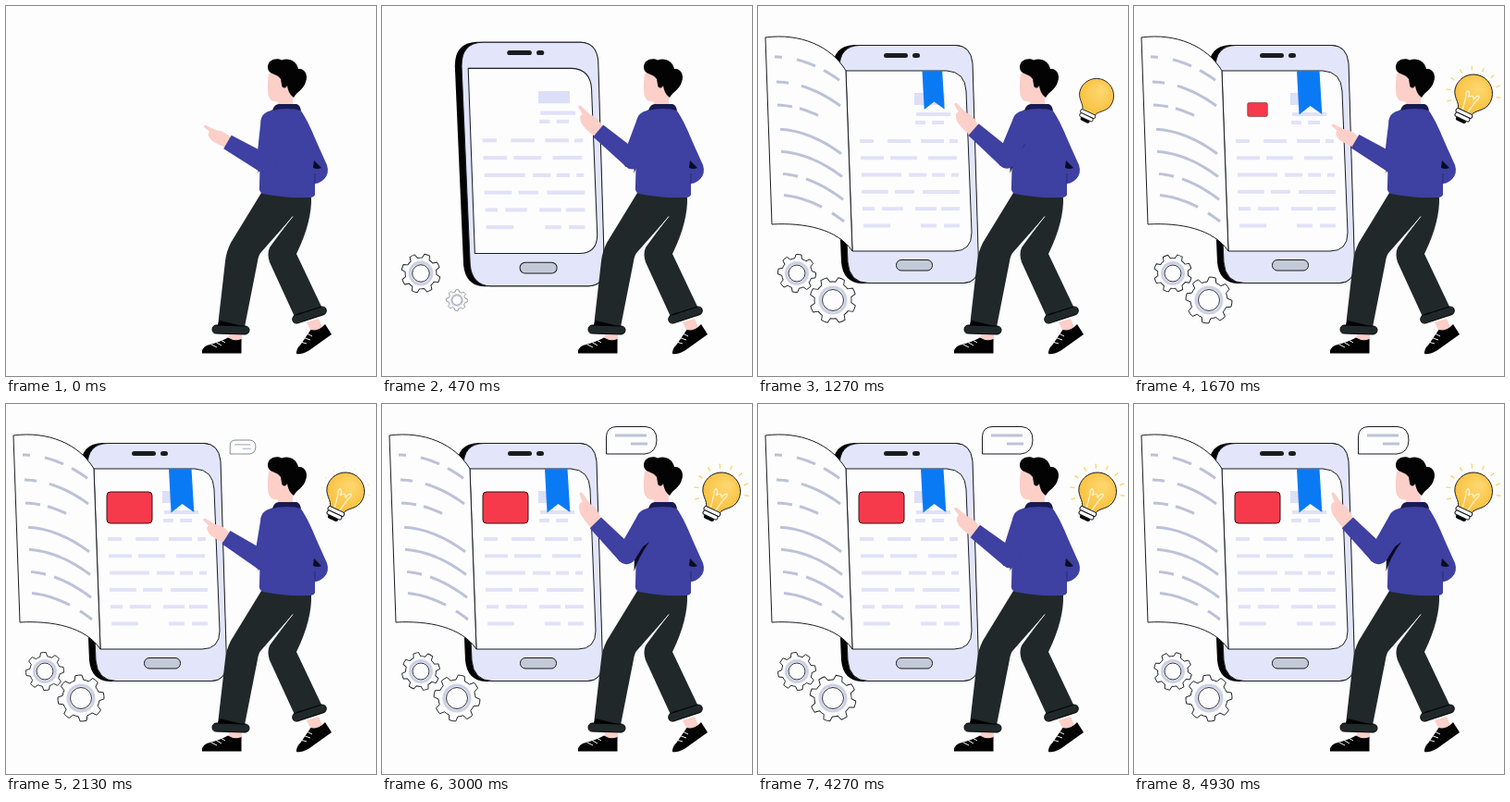
An HTML page with a canvas for the animation above (4.99 s loop, 400x400 px).

```html
<!DOCTYPE html>
<html lang="en">
<head>
<meta charset="utf-8">
<title>Reading on a phone</title>
<style>
html, body { margin: 0; width: 100%; height: 100%; overflow: hidden; background: #fdfdfd; }
canvas { display: block; width: 100vw; height: 100vh; }
</style>
</head>
<body>
<canvas id="stage"></canvas>
<script>
const LOOP = 4990, STEP = LOOP / 75, TAU = Math.PI * 2;
const PAPER = '#fdfdfd', INK = '#1a1c22', GREY = '#bcc2d8', SKIN = '#fccfc8';
const SHIRT = '#3e40a2', SHADE = '#0a0c1e', TROUSERS = '#20282a', BLACK = '#030304';

const canvas = document.getElementById('stage');
const ctx = canvas.getContext('2d');
const ratio = window.devicePixelRatio || 1;
canvas.width = canvas.height = 400 * ratio;

const mix = (a, b, u) => a + (b - a) * u;
const clamp = x => Math.min(1, Math.max(0, x));
const smooth = x => { x = clamp(x); return x * x * (3 - 2 * x); };

// Grow past full size, then settle.
function pop(t, start, peak = 1.2) {
  const d = t - start;
  return d < 300 ? peak * smooth(d / 300) : mix(peak, 1, smooth((d - 300) / 220));
}

function shape(d, fill, stroke, width = 1) {
  const p = new Path2D(d);
  if (fill) { ctx.fillStyle = fill; ctx.fill(p); }
  if (stroke) { ctx.strokeStyle = stroke; ctx.lineWidth = width; ctx.stroke(p); }
}

function bar(x, y, w, h, r, fill, stroke) {
  ctx.beginPath();
  ctx.roundRect(x, y, w, h, r);
  ctx.fillStyle = fill;
  ctx.fill();
  if (stroke) { ctx.strokeStyle = stroke; ctx.lineWidth = 1; ctx.stroke(); }
}

function circle(x, y, r, fill, stroke, width = 1) {
  ctx.beginPath();
  ctx.arc(x, y, r, 0, TAU);
  if (fill) { ctx.fillStyle = fill; ctx.fill(); }
  if (stroke) { ctx.strokeStyle = stroke; ctx.lineWidth = width; ctx.stroke(); }
}

function scaled(x, y, s, draw) {
  if (s <= 0.001) return;
  ctx.save();
  ctx.translate(x, y);
  ctx.scale(s, s);
  ctx.translate(-x, -y);
  draw();
  ctx.restore();
}

function turned(x, y, angle, draw) {
  ctx.save();
  ctx.translate(x, y);
  ctx.rotate(angle);
  draw();
  ctx.restore();
}

const TEXT_ROWS = [
  [110, 125, 140, 165, 176, 201, 207, 216],
  [111, 136, 143, 172, 184, 215],
  [112, 155, 163, 182, 188, 202, 209, 217],
  [112, 141, 148, 169, 178, 218],
  [113, 126, 134, 157, 170, 193, 198, 218],
  [114, 143, 176, 193, 201, 218]
];

function phone() {
  shape('M104 42H214Q230 43 232 62L238.500 280Q238.500 299 222 300H112Q92 299 90 277L81 68Q80.500 43 104 42Z', BLACK);
  shape('M110 42.5H214Q230 43 232 62L238.500 280Q238.500 299 222 299.5H119Q99 299 97 277L88 68Q87.500 43 110 42.5Z', '#e3e6fa', INK);
  shape('M95 70H204Q224 71 225 92L231 245Q231 265 212 265H102Z', '#fdfdfe', INK);
  bar(136, 51, 26, 5, 2.5, INK);
  bar(167, 51, 8, 5, 2.5, INK);
  bar(149.5, 274.5, 39, 11.5, 5.5, '#c3c9d6', INK);
  bar(169, 94, 33, 13, 0, '#dcdff8');
  const pale = '#e1e2f8';
  bar(171, 115, 37, 4, 0, pale);
  bar(170, 124, 11, 4, 0, pale);
  bar(188, 124, 13, 4, 0, pale);
  TEXT_ROWS.forEach((row, i) => {
    for (let k = 0; k < row.length; k += 2)
      bar(row[k], 144 + i * 18.3, row[k + 1] - row[k], 4, 0, pale);
  });
}

const PAGE_ROWS = [
  [55, 18, 26, 42, 62, 71, 88],
  [82, 20, 33, 47, 89],
  [107, 21, 37, 45, 65],
  [133, 24, 90],
  [157, 25, 91],
  [181, 27, 43, 52, 92],
  [204, 28, 69, 80, 93]
];

function page(s) {
  if (s <= 0.001) return;
  ctx.save();
  ctx.transform(s, 0, (1 - s) * 0.0359, 1, (1 - s) * 92.5, 0);
  shape('M8 34C45 29 79 43 95 70L102 265C86 241 50 234 15 236Z', PAPER, INK);
  ctx.strokeStyle = GREY;
  ctx.lineWidth = 3;
  for (const [y, ...ends] of PAGE_ROWS) {
    for (let k = 0; k < ends.length; k += 2) {
      ctx.beginPath();
      for (let j = 0; j <= 8; j++) {
        const x = mix(ends[k], ends[k + 1], j / 8);
        ctx.lineTo(x, y + 26 * ((x - 18) / 71) ** 2);
      }
      ctx.stroke();
    }
  }
  ctx.restore();
}

function gear(x, y, r, hole, angle, s) {
  scaled(x, y, s, () => {
    turned(x, y, angle, () => {
      const pitch = TAU / 8, root = r * 0.8;
      ctx.beginPath();
      for (let i = 0; i < 8; i++) {
        const a = i * pitch;
        ctx.arc(0, 0, r, a - pitch * 0.18, a + pitch * 0.18);
        ctx.arc(0, 0, root, a + pitch * 0.31, a + pitch * 0.69);
      }
      ctx.closePath();
      ctx.fillStyle = PAPER;
      ctx.fill();
      ctx.strokeStyle = INK;
      ctx.lineWidth = 0.9;
      ctx.stroke();
    });
    circle(x, y, hole + 2.5, null, '#cdd1e6', 3);
    circle(x, y, hole, PAPER, INK, 0.9);
  });
}

function bookmark() {
  shape('M176 70H200.500L203.300 117L190.500 108L178.500 117.500Z', '#0a7af4');
}

function card() {
  bar(109, 95, 49, 34, 4, '#f63a4b', '#3a1014');
}

function bubble() {
  shape('M242.5 54V35Q243 24.5 254 24.5H285Q297 25.5 297 39Q296.500 53 284 54Z', PAPER, INK);
  bar(252, 32.5, 34, 3, 0, GREY);
  bar(269, 41.5, 18, 3, 0, GREY);
}

function bulb(t) {
  const glow = ctx.createRadialGradient(373, 88, 3, 367, 95, 24);
  glow.addColorStop(0, '#fdd56c');
  glow.addColorStop(1, '#f8c03c');
  turned(367, 94.5, 0.44, () => {
    ctx.beginPath();
    ctx.moveTo(-8, 23);
    ctx.bezierCurveTo(-8, 15, -20.5, 13, -20.5, 0);
    ctx.arc(0, 0, 20.5, Math.PI, 0);
    ctx.bezierCurveTo(20.5, 13, 8, 15, 8, 23);
    ctx.closePath();
  });
  ctx.fillStyle = glow;
  ctx.fill();
  ctx.strokeStyle = INK;
  ctx.lineWidth = 1;
  ctx.stroke();

  turned(367, 94.5, 0.44, () => {
    ctx.globalAlpha = smooth((t - 1300) / 300);
    shape('M-3 22L-6 6Q-9 1 -6 0Q-3 2 -3 6Q0 0 3 6Q3 2 6 0Q9 1 6 6L3 22', null, '#fff3cd', 1.3);
    ctx.globalAlpha = 1;
    bar(-6, 29, 12, 5, 2.5, BLACK);
    bar(-9.5, 21.5, 19, 4.5, 2, PAPER, INK);
    bar(-8.5, 26, 17, 4.5, 2, PAPER, INK);
  });

  const beat = 0.5 + 0.5 * Math.cos(TAU * (t - 3000) / 645);
  ctx.globalAlpha = smooth((t - 1500) / 200) * mix(0.3, 1, beat);
  ctx.strokeStyle = '#fad162';
  ctx.lineWidth = 1.3;
  ctx.beginPath();
  for (let i = 0; i < 9; i++) {
    const a = 2.85 + i * 0.45;
    const far = mix(26, 30, beat);
    ctx.moveTo(367 + 25 * Math.cos(a), 94.5 + 25 * Math.sin(a));
    ctx.lineTo(367 + far * Math.cos(a), 94.5 + far * Math.sin(a));
  }
  ctx.stroke();
  ctx.globalAlpha = 1;
}

function legs() {
  // feet
  shape('M241 350H255V363H241Z', SKIN);
  shape('M212 375.5Q211 370 217 367Q230 364 240 358.5Q247 363 254.5 360V375.5Z', BLACK);
  shape('M325 342L338 338L343 349L331 354Z', SKIN);
  shape('M314 376Q313.500 371 318.500 366L329.500 350Q338 352 345 344L352 355L327.500 372.500Q318 377.500 314 376Z', BLACK);
  shape('M222 366L228 369M227 363.5L233 367M232 361L237 364M318 363L325 365M322 358.5L329 361M325 354L331 357', null, '#f4f4f6', 1);
  // trousers
  shape('M300 203L330 206Q331 233 314 268L342 327L313 338L285 277Q282 268 285 261L310 227Z', TROUSERS);
  shape('M276 202L330 207L310 227.5L276 266Q273 269 272 276L258 347L229 346L237 276Q238 266 243 256Z', TROUSERS);
  shape('M310 227.5L280 265', null, '#f2f3f6', 1);
  shape('M228 347L231 340L256 346Z', BLACK);
  shape('M312 338L316 332L336 329Z', BLACK);
  turned(243, 350, 0.03, () => bar(-20, -4.5, 40, 9, 4.5, TROUSERS, BLACK));
  turned(328, 334, -0.32, () => bar(-19, -4.5, 38, 9, 4.5, TROUSERS, BLACK));
}

function head() {
  shape('M294 90H310V109H294Z', SKIN);
  shape('M284 73Q282 87 283.5 96Q285 104 294 103.5Q306 103 308 90L304 68Z', SKIN);
  shape('M283 66C283 57.500 293 55.500 298 58.500C305 55.500 314 58.500 316 68C323 67 327 75 324 82C322 90 315 92 311 99C307 96 305 92 304 86C302 90 298 89 298 85L297 79C293 74 289 74 286 72Q283 70 283 66Z', BLACK);
}

function torso() {
  shape('M289 112Q301 109 318 112C326 123 332 138 338 152L347 172Q350 181 344 187Q339 192 334 192V204Q333 207 328 207Q301 208 278 203Q273 202 274 194L275.5 135Q277 115 289 112Z', SHIRT);
  shape('M288 113Q290 106 295 106H314Q318 107 319 113Q303 109 288 113Z', '#181b52');
  shape('M333 167L341 175Q337 177 332 175Z', SHADE);
  shape('M334 192V181', null, '#2a2c7c', 1);
  shape('M289 149L273 161L272.5 181Q277 166 289 149Z', SHADE);
}

// Tapered limb with round ends.
function limb(x0, y0, r0, x1, y1, r1, roundEnd) {
  const a = Math.atan2(y1 - y0, x1 - x0) + Math.PI / 2;
  const c = Math.cos(a), s = Math.sin(a);
  ctx.fillStyle = SHIRT;
  ctx.beginPath();
  ctx.moveTo(x0 + c * r0, y0 + s * r0);
  ctx.lineTo(x1 + c * r1, y1 + s * r1);
  ctx.lineTo(x1 - c * r1, y1 - s * r1);
  ctx.lineTo(x0 - c * r0, y0 - s * r0);
  ctx.fill();
  circle(x0, y0, r0, SHIRT);
  if (roundEnd) circle(x1, y1, r1, SHIRT);
}

function arm(t) {
  const lift = clamp(0.5 - 0.57 * Math.cos(TAU * (t / 1930 + 0.04)));
  const ex = mix(281, 264, lift), ey = mix(171, 162.5, lift);
  const a = mix(30, 46, lift) * TAU / 360;
  const wx = ex - 48 * Math.cos(a), wy = ey - 48 * Math.sin(a);
  turned(wx, wy, Math.PI + mix(32, 61, lift) * TAU / 360, () => {
    const size = mix(0.86, 1.02, lift);
    ctx.scale(size, size);
    shape('M-4 -6.5L-4 6.5L8 8Q15 8 20 5L34 3.5Q38 1.5 34 0L26 -1Q27 -5 23 -7Q18 -10 12 -9Q6 -9 -4 -6.5Z', SKIN);
  });
  limb(287, 125, 11.5, ex, ey, 10.5, true);
  limb(ex, ey, 10.5, wx, wy, 8.5, false);
}

function draw(t) {
  ctx.setTransform(ratio, 0, 0, ratio, 0, 0);
  ctx.fillStyle = PAPER;
  ctx.fillRect(0, 0, 400, 400);
  ctx.lineJoin = 'round';

  scaled(165, 171, pop(t, 0, 1.17), phone);
  page(pop(t, 600, 1.09));
  const spin = t / 1000 * 0.7;
  gear(42, 289, 20.5, 9, spin, pop(t, 0));
  gear(81, 318, 25, 11.5, 0.3 - spin * 0.8, pop(t, 340));
  scaled(189, 70, pop(t, 1065), bookmark);
  scaled(133.5, 112, pop(t, 1540), card);
  scaled(242, 54, pop(t, 2000, 1.28), bubble);
  scaled(355, 123, pop(t, 1060), () => bulb(t));

  legs();
  head();
  torso();
  arm(t);
}

const began = performance.now();
function tick() {
  const t = (performance.now() - began) % LOOP;
  draw(Math.floor(t / STEP) * STEP);
  requestAnimationFrame(tick);
}
tick();
</script>
</body>
</html>
```
